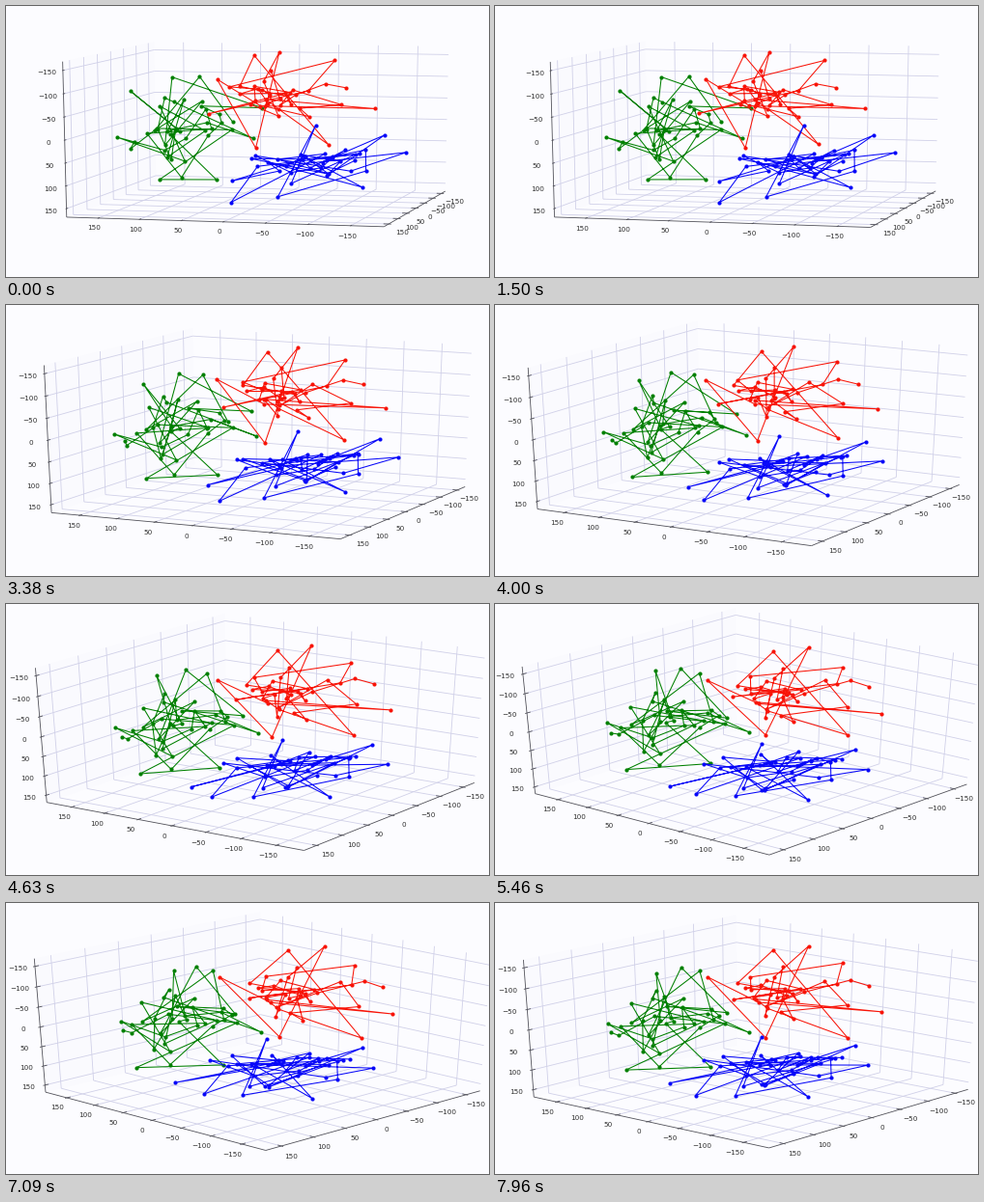
Recreate the animation shown at these times as a matplotlib script. Size 500x281 px, loop 8 s.

```python
import numpy as np
import matplotlib.pyplot as plt
from matplotlib.animation import FuncAnimation
from matplotlib.collections import LineCollection, PolyCollection

W, H, DPI = 500, 281, 100
STEP, LOOP = 40, 8000
CX, CY, KX, KY, DIST = 266, 128, 3130, 1519, 10

HALF = 0.5 * (1 + 1 / 24)          # panes reach a little past the unit cube
SPAN = np.array([362, 334, 324])   # data range on each axis
TICKS = np.arange(-150, 151, 50)

# camera path: seconds, azimuth and elevation in degrees
KEY_T = np.array([1.2, 2.34, 3.38, 4.63, 5.46, 7.09, 7.96])
KEY_AZ = np.array([14, 20.5, 25.8, 35, 40.8, 44.3, 40.8])
KEY_EL = np.array([10.7, 14.5, 19, 29.3, 34, 29, 26.5])


def cloud(seed, center, radius, outer, count=30):
    """Random path through an ellipsoid and a few outlying points."""
    rng = np.random.default_rng(seed)
    ray = rng.normal(size=(count, 3))
    ray /= np.linalg.norm(ray, axis=1, keepdims=True)
    inner = center + ray * rng.random((count, 1)) ** 0.5 * radius
    return rng.permutation(np.vstack([inner, outer]))


CLOUDS = {
    "#008000": cloud(4, (-0.24, 0.16, 0.04), (0.19, 0.24, 0.25), [
        (-0.43, 0.24, -0.03), (-0.47, -0.05, 0.24), (-0.31, 0, 0.35),
        (-0.21, 0.02, 0.36), (-0.26, 0.34, -0.29), (-0.15, 0.04, -0.35),
        (-0.22, 0.22, -0.30), (-0.04, -0.03, -0.07), (0.04, 0.17, 0.18),
        (-0.39, 0.23, -0.11)]),
    "#f81408": cloud(7, (0.05, -0.16, 0.22), (0.22, 0.22, 0.20), [
        (-0.02, -0.31, 0.49), (-0.08, -0.20, 0.48), (0.19, -0.23, 0.45),
        (0.32, -0.28, 0.11), (0.20, -0.36, 0.24), (0.15, -0.32, -0.16),
        (-0.06, -0.14, -0.16), (-0.14, 0.06, 0.35), (-0.23, -0.17, 0.07)]),
    "#0808f8": cloud(11, (0.18, 0.05, -0.21), (0.24, 0.28, 0.15), [
        (0.48, -0.02, -0.14), (0.40, -0.05, -0.03), (0.37, 0.15, -0.35),
        (-0.05, 0.23, -0.46), (0, 0.41, -0.27), (0.23, 0.22, 0.08),
        (0.05, 0.30, -0.12), (0.10, 0.20, -0.42)]),
}


def hermite(t, keys, vals):
    slope = np.gradient(vals, keys)
    slope[0] = 0
    t = np.clip(t, keys[0], keys[-1])
    i = min(np.searchsorted(keys, t, side="right") - 1, len(keys) - 2)
    d = keys[i + 1] - keys[i]
    u = (t - keys[i]) / d
    ease = u * u * (3 - 2 * u)
    return (vals[i] + (vals[i + 1] - vals[i]) * ease
            + d * u * (1 - u) * ((1 - u) * slope[i] - u * slope[i + 1]))


def camera(az, el):
    """Right, up and toward-the-eye vectors."""
    s, c = np.sin(np.radians(az)), np.cos(np.radians(az))
    se, ce = np.sin(np.radians(el)), np.cos(np.radians(el))
    return (np.array([c, -s, 0]),
            np.array([-s * se, -c * se, ce]),
            np.array([s * ce, c * ce, se]))


def project(p, cam):
    right, up, eye = cam
    depth = DIST - p @ eye
    return np.stack([CX + KX * (p @ right) / depth,
                     CY - KY * (p @ up) / depth], axis=-1)


def build_box():
    h = HALF
    grid, labels = [], []
    lines = [[(-h, h, h), (-h, h, -h)], [(-h, h, -h), (h, h, -h)],
             [(h, h, -h), (h, -h, -h)]]
    inner, outer = h - 0.0167, h + 0.0083
    for t in TICKS:
        a, b, c = np.array([-t, t, -t]) / SPAN
        grid += [[(a, h, -h), (a, -h, -h)], [(a, -h, -h), (a, -h, h)],
                 [(h, b, -h), (-h, b, -h)], [(-h, b, -h), (-h, b, h)],
                 [(-h, h, c), (-h, -h, c)], [(-h, -h, c), (h, -h, c)]]
        lines += [[(a, inner, -h), (a, outer, -h)],
                  [(inner, b, -h), (outer, b, -h)],
                  [(-h, inner, c), (-h, outer, c)]]
        text = str(t).replace("-", "\u2212")
        low, side = h + 0.045, h + 0.04
        labels += [(text, (a, low, -low)), (text, (low, b, -low)),
                   (text, (-side, side, c))]
    return np.array(grid), np.array(lines), labels


grid, lines, labels = build_box()
label_pos = np.array([pos for _, pos in labels])
wall = HALF * np.array([[(-1, 1, -1), (-1, -1, -1), (-1, -1, 1), (-1, 1, 1)]])

fig = plt.figure(figsize=(W / DPI, H / DPI), dpi=DPI, facecolor="#fcfcff")
ax = fig.add_axes([0, 0, 1, 1])
ax.set_xlim(0, W)
ax.set_ylim(H, 0)
ax.axis("off")

wall_art = PolyCollection([], facecolors="#fafafe", zorder=1)
grid_art = LineCollection([], colors="#d0d0e8", linewidths=0.6, zorder=2)
line_art = LineCollection([], colors="#505058", linewidths=0.6, zorder=3)
for art in (wall_art, grid_art, line_art):
    ax.add_collection(art, autolim=False)

texts = [ax.text(0, 0, s, fontsize=5.2, family="DejaVu Sans", color="#303030",
                 ha="center", va="center", zorder=4) for s, _ in labels]
paths = [ax.plot([], [], "-o", color=color, lw=0.75, ms=3, mew=0, zorder=5)[0]
         for color in CLOUDS]


def draw(frame):
    t = frame * STEP / 1000
    cam = camera(hermite(t, KEY_T, KEY_AZ), hermite(t, KEY_T, KEY_EL))
    wall_art.set_verts(project(wall, cam))
    grid_art.set_segments(project(grid, cam))
    line_art.set_segments(project(lines, cam))
    for text, (x, y) in zip(texts, project(label_pos, cam)):
        text.set_position((x, y + 2))
    for path, points in zip(paths, CLOUDS.values()):
        path.set_data(*project(points, cam).T)
    return [wall_art, grid_art, line_art, *texts, *paths]


anim = FuncAnimation(fig, draw, frames=LOOP // STEP, interval=STEP,
                     repeat=True, repeat_delay=0, blit=False)
plt.show()
```
